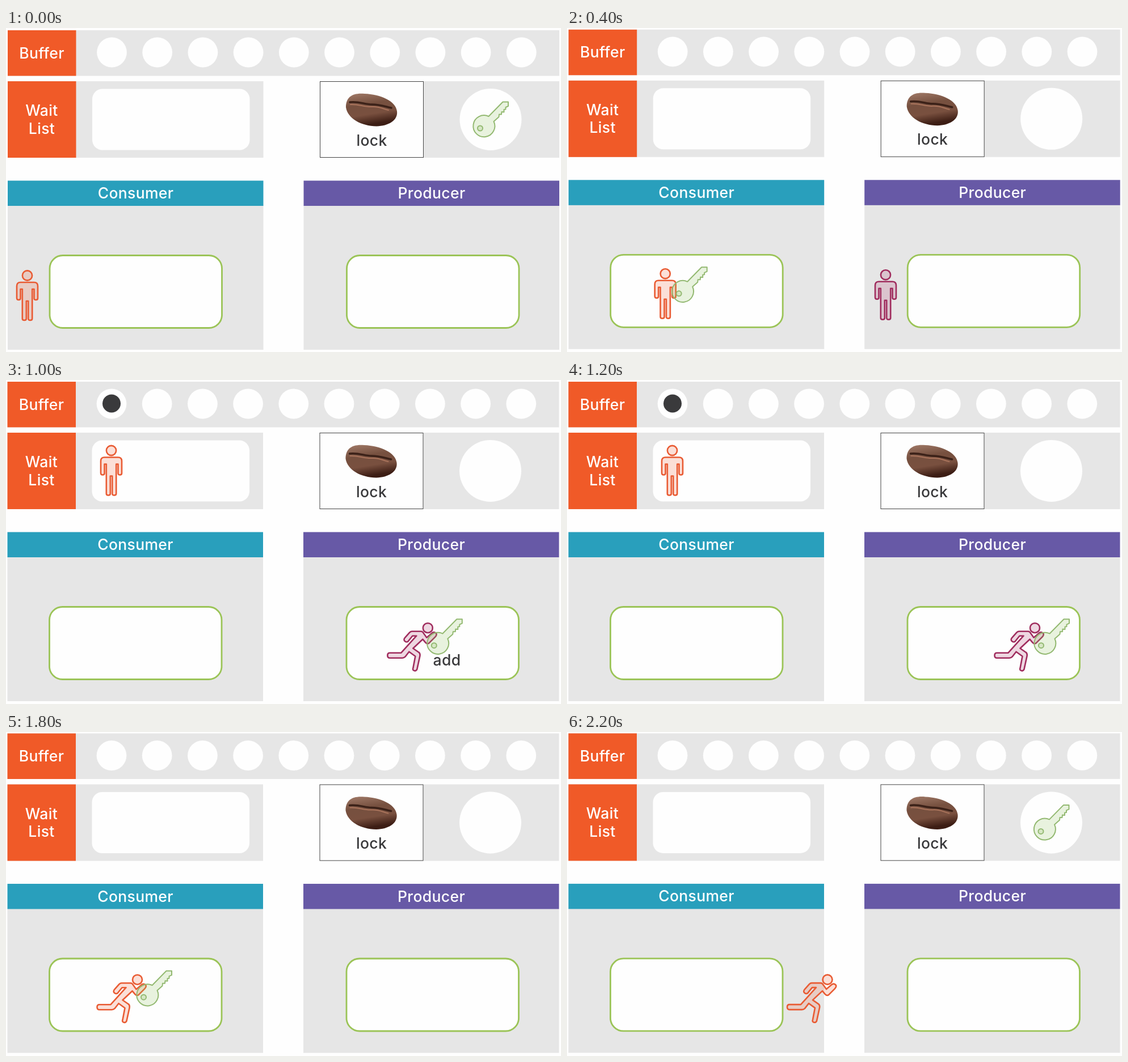
Animation, 978 px wide and 572 px high, one loop 2400 ms. Source, as an HTML page:

```html
<!DOCTYPE html>
<html lang="en">
<head>
<meta charset="utf-8">
<title>Consumer and producer sharing a lock</title>
<style>
  html, body { margin: 0; width: 100%; height: 100%; overflow: hidden; background: #fefefe; }
  svg { display: block; width: 978px; height: 572px; }
  text { font: 500 26.5px Inter, "Open Sans", sans-serif; letter-spacing: .35px; text-anchor: middle; fill: #fff; }
  .dark { fill: #39393b; }
  .orange { fill: #f05a28; }
  .panel { fill: #e6e6e6; }
  .hole { fill: #fefefe; }
  .box { fill: #fefefe; stroke: #9bc457; stroke-width: 2.8; }
  .person { stroke-width: 2.6; stroke-linejoin: round; fill-opacity: .19; }
  #consumer { stroke: #e95b33; fill: #ee5a30; }
  #producer { stroke: #a02d5e; fill: #a83468; }
  #key { stroke: #93b971; stroke-width: 2; stroke-linejoin: round; fill: #8fc05f; fill-opacity: .2; }
</style>
</head>
<body>
<svg viewBox="0 0 978 572">
  <defs>
    <linearGradient id="roast" x1="0" y1="0" x2=".25" y2="1">
      <stop offset="0" stop-color="#a27b69"/>
      <stop offset=".4" stop-color="#76503f"/>
      <stop offset=".7" stop-color="#79503f"/>
      <stop offset="1" stop-color="#3c1d14"/>
    </linearGradient>
    <g id="stand">
      <circle r="8.6"/>
      <path d="M-12 12H12Q18.5 12 18.5 18.5V40Q18.5 43 15.2 43T12 40V24H8.7V76Q8.7 79 5.2 79T1.7 76V45H-1.7V76Q-1.7 79 -5.2 79T-8.7 76V24H-12V40Q-12 43 -15.2 43T-18.5 40V18.5Q-18.5 12 -12 12Z"/>
    </g>
    <g id="run">
      <circle r="8.5"/>
      <path d="M-28 6H-12Q-9 6 -7 10L-2 17L8 8.5Q12 6 15 10Q16 13 13 16L2 27Q-1 29 -4 26L-9 20L-26 36L-16 43Q-13 45 -14 50L-19 73Q-21 77 -25 75Q-27 74 -26 71L-22 50L-33 42L-40 51Q-42 53 -45 53H-67Q-71 53 -71 48.5T-67 44H-47L-20 14H-27L-35 24Q-38 26 -41 23Q-43 20 -40 17L-32 8Q-30 6 -28 6Z"/>
    </g>
  </defs>
  <g id="scene">
    <g id="board"></g>
    <g id="bean">
      <path fill="url(#roast)" d="M599 140C599 122 610 114 632 116C660 117 687 129 689 147C691 163 674 173 653 173.500C626 173 602 160 599 140Z"/>
      <path fill="none" stroke="#3b2118" stroke-width="3.500" stroke-linecap="round" d="M606 131C622 129 632 135 645 135S666 138 679 141"/>
      <path fill="none" stroke="#a9735b" stroke-width="2" stroke-linecap="round" d="M607 135C621 134 632 140 645 139S664 143 674 145"/>
    </g>
    <circle id="item" cx="186.500" cy="42.500" r="16" fill="#3a3a3c"/>
    <use id="consumer" class="person"/>
    <use id="producer" class="person"/>
    <g id="key">
      <path d="M9 -16.500L34 -42H43.500V-34.500L39 -32.500V-29L36 -28.500V-24L32 -24.500L31.500 -20L27.500 -20L27 -15.500L18 -7.500A19 19 0 1 1 9 -16.500Z"/>
      <circle cx="-6" cy="4.500" r="4.500"/>
    </g>
    <text id="add" class="dark" x="777.500" y="505">add</text>
  </g>
</svg>
<script>
const $ = id => document.getElementById(id);
const STEP = 200;

const rect = (x, y, w, h, attrs) => `<rect x="${x}" y="${y}" width="${w}" height="${h}" ${attrs}/>`;
const hole = (x, y, r) => `<circle class="hole" cx="${x}" cy="${y}" r="${r}"/>`;
const label = (x, y, words, cls = '') => `<text class="${cls}" x="${x}" y="${y}">${words}</text>`;

const side = (x, color, name, boxX) =>
  rect(x, 313, 450.5, 255, 'class="panel"') +
  rect(x, 269.5, 450.5, 44.5, `fill="${color}"`) +
  label(x + 225.5, 301, name) +
  rect(boxX, 401.5, 303.5, 128, 'rx="23" class="box"');

$('board').innerHTML =
  rect(3, 4, 972, 80.5, 'class="panel"') +
  rect(3, 4, 120.5, 80.5, 'class="orange"') +
  label(63, 53.5, 'Buffer') +
  Array.from({ length: 10 }, (_, i) => hole(186.5 + 80.2 * i, 43, 26.4)).join('') +
  rect(3, 94, 450.5, 135, 'class="panel"') +
  rect(3, 94, 120.5, 135, 'class="orange"') +
  label(63, 155, 'Wait') + label(63, 186.500, 'List') +
  rect(152, 107.5, 277.5, 108, 'rx="18" class="hole"') +
  rect(736, 94, 239, 135, 'class="panel"') +
  rect(553.5, 94.5, 182, 134, 'fill="#fefefe" stroke="#444"') +
  label(644.5, 207.5, 'lock', 'dark') +
  hole(854, 161.500, 54.5) +
  side(3, '#299fbc', 'Consumer', 77) +
  side(524.5, '#6759a6', 'Producer', 600.5);

// Poses: [shape, head x, head y]
const stand = (x, y = 437) => ['stand', x, y];
const run = x => ['run', x, 438.7];
const waiting = stand(186, 125.5);
const ready = stand(561.8);
const checking = stand(173.5, 435);

// shift: small camera jitter; holder: who carries the key
const steps = [
  { shift: [0, 0], consumer: stand(37.5) },
  { shift: [-.5, -1], consumer: run(163.5), producer: ready, holder: 'consumer' },
  { shift: [-.3, -1.2], consumer: checking, producer: ready, holder: 'consumer' },
  { shift: [0, -1.4], consumer: waiting, producer: ready },
  { shift: [-.3, -1.2], consumer: waiting, producer: run(687), holder: 'producer' },
  { shift: [-.5, -1], consumer: waiting, producer: run(743.8), holder: 'producer', item: 1, add: 1 },
  { shift: [-.5, -1], consumer: waiting, producer: run(825), holder: 'producer', item: 1 },
  { shift: [-.5, -1], consumer: waiting, producer: run(983), item: 1 },
  { shift: [-.5, -1], consumer: checking, holder: 'consumer', item: 1 },
  { shift: [-.5, -1.5], consumer: run(232), holder: 'consumer' },
  { shift: [-.5, -2.2], consumer: run(301.5), holder: 'consumer' },
  { shift: [-.5, -1.6], consumer: run(459.5) }
];

const move = (el, x, y) => el.setAttribute('transform', `translate(${x} ${y})`);
const show = (el, on) => el.setAttribute('visibility', on ? 'visible' : 'hidden');

function place(id, pose) {
  show($(id), pose);
  if (!pose) return;
  $(id).setAttribute('href', '#' + pose[0]);
  move($(id), pose[1], pose[2]);
}

function keySpot(step) {
  if (!step.holder) return [841.5, 172.5];
  const [shape, x, y] = step[step.holder];
  return shape === 'run' ? [x + 17, y + 26.5] : [x + 30, y + 30.5];
}

let last = -1;
function draw(now) {
  const i = Math.floor(now / STEP) % steps.length;
  if (i !== last) {
    const step = steps[last = i];
    move($('scene'), ...step.shift);
    place('consumer', step.consumer);
    place('producer', step.producer);
    move($('key'), ...keySpot(step));
    show($('item'), step.item);
    show($('add'), step.add);
  }
  requestAnimationFrame(() => draw(performance.now() - start));
}
const start = performance.now();
draw(0);
</script>
</body>
</html>
```
